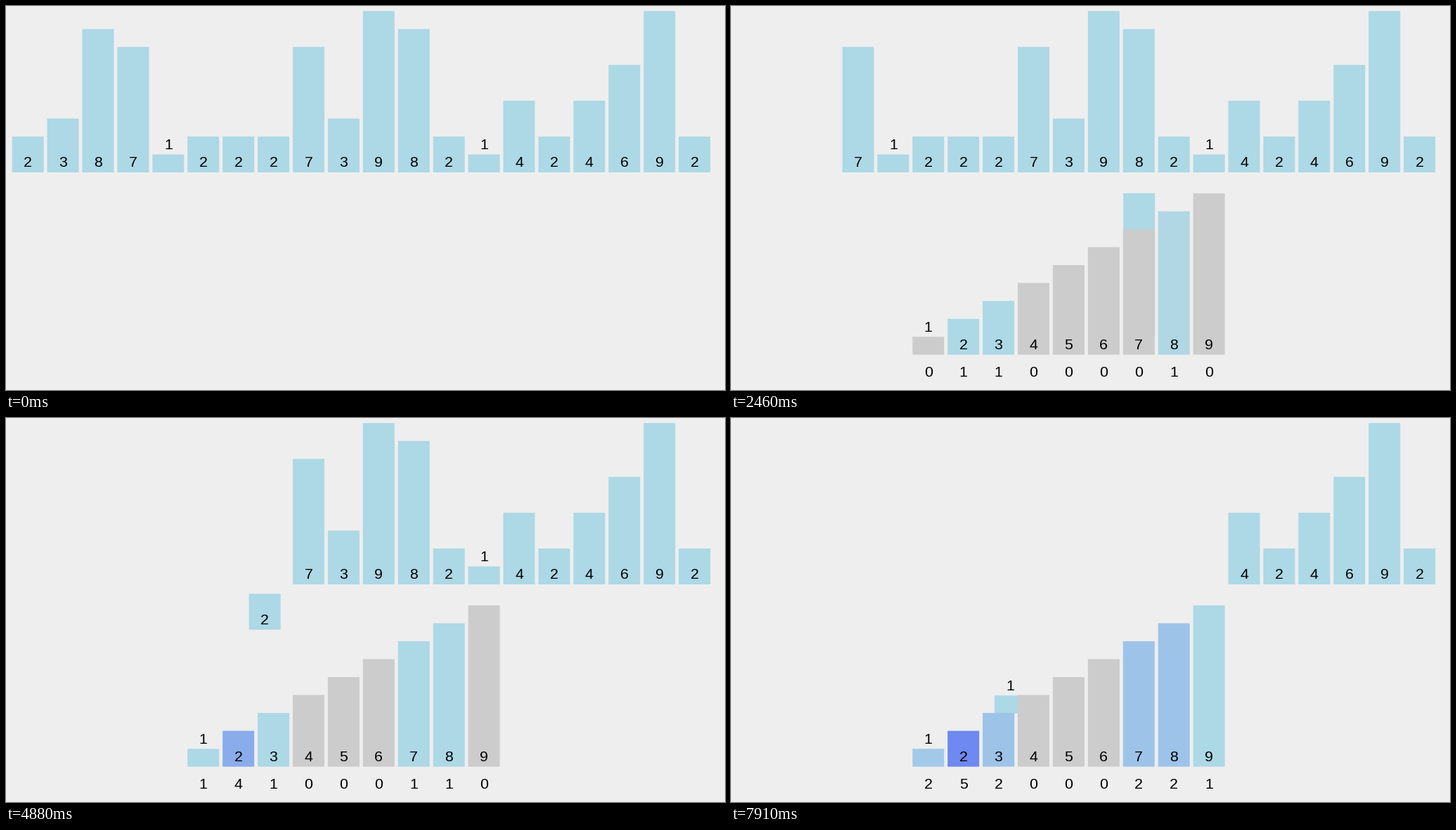
These frames come from a looping animation (1023x547 px, 7.99 s). A matplotlib script:

```python
import matplotlib.pyplot as plt
from matplotlib.animation import FuncAnimation
from matplotlib.patches import Rectangle

W, H = 1023, 547
LOOP, TICK = 7990, 10
DATA = [2, 3, 8, 7, 1, 2, 2, 2, 7, 3, 9, 8, 2, 1, 4, 2, 4, 6, 9, 2]
BUCKETS = range(1, 10)

LEFT, PITCH, BAR_W, UNIT = 8.65, 49.92, 45, 25.53
TOP_BASE, LOW_BASE = 237, 496.7
BACK = (238, 238, 238)
GREY, LIGHT, BLUE = (204, 204, 204), (173, 216, 230), (0, 0, 255)

# One transition per period; the picture refreshes on a coarser, separate beat
FIRST, PERIOD, DURATION = 1278.6, 498.6, 250
REFRESH, PHASE = 77.9, 817


def ease(t):
    """Cubic ease in and out."""
    t = min(t, 1)
    return 4 * t ** 3 if t < 0.5 else 1 - 4 * (1 - t) ** 3


def progress(now, step):
    """Eased progress of a transition, or None before it starts."""
    t = (now - FIRST - step * PERIOD) / DURATION
    return ease(t) if t >= 0 else None


def mix(a, b, k):
    return tuple(p + (q - p) * k for p, q in zip(a, b))


def rgb(c):
    return tuple(v / 255 for v in c)


def tone(count):
    return GREY if count == 0 else mix(LIGHT, BLUE, (count - 1) / 11)


def slot(i):
    return LEFT + PITCH * i


fig = plt.figure(figsize=(W / 100, H / 100), dpi=100, facecolor=rgb(BACK))
ax = fig.add_axes([0, 0, 1, 1])
ax.set_xlim(0, W)
ax.set_ylim(H, 0)
ax.axis("off")


def label(x, y, text, z):
    return ax.text(x, y, text, family="Liberation Sans", fontsize=15.4,
                   color="black", ha="center", va="baseline", zorder=z)


class Bar:
    def __init__(self, value, x, base, color, z):
        self.value = value
        self.rect = Rectangle((0, 0), BAR_W, UNIT * value, lw=0,
                              fc=rgb(color), snap=False, zorder=z)
        ax.add_patch(self.rect)
        self.text = label(0, 0, str(value), z + 0.1)
        self.place(x, base)

    def place(self, x, base):
        self.rect.set_xy((x, base - UNIT * self.value))
        lift = 33.2 if self.value == 1 else 7.7
        self.text.set_position((x + BAR_W / 2, base - lift))

    def show(self, alpha):
        for part in (self.rect, self.text):
            part.set_visible(alpha > 0)
            part.set_alpha(alpha)


items = [Bar(v, slot(i), TOP_BASE, LIGHT, 1 + i * 0.2)
         for i, v in enumerate(DATA)]
bins = [Bar(v, slot(v + 4), LOW_BASE, GREY, 10 + v) for v in BUCKETS]
counts = [label(slot(v + 4) + BAR_W / 2, LOW_BASE + 30.8, "0", 30)
          for v in BUCKETS]


def draw(frame):
    now = PHASE + REFRESH * ((frame * TICK - PHASE) // REFRESH)
    fade = progress(now, -1) or 0
    tally = [0] * len(bins)
    colors = [GREY] * len(bins)

    for i, (item, value) in enumerate(zip(items, DATA)):
        k = progress(now, i)
        item.show(0 if k == 1 else 1)
        item.place(slot(i), TOP_BASE)
        if k is None:
            continue
        b = value - 1
        item.place(slot(i) + (slot(value + 4) - slot(i)) * k,
                   TOP_BASE + (LOW_BASE - TOP_BASE) * k)
        tally[b] += 1
        colors[b] = mix(tone(tally[b] - 1), tone(tally[b]), k)

    for bar, count, n, color in zip(bins, counts, tally, colors):
        bar.show(fade)
        bar.rect.set_facecolor(rgb(color))
        count.set_text(str(n))
        count.set_visible(fade > 0)
        count.set_alpha(fade)
    return []


anim = FuncAnimation(fig, draw, frames=LOOP // TICK, interval=TICK,
                     repeat=True, repeat_delay=0, blit=False)
plt.show()
```
